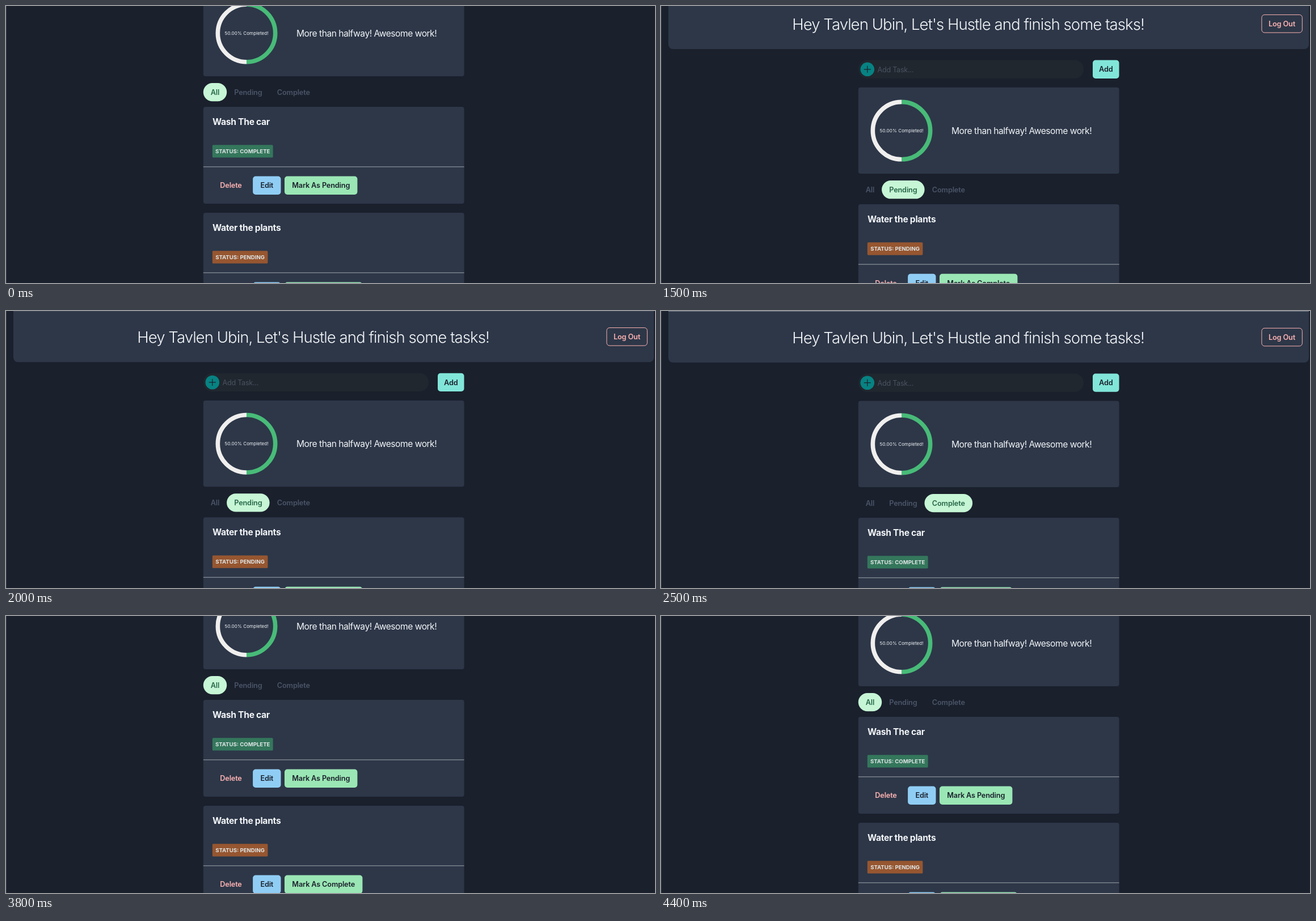
An HTML page that plays this animation: 1144 by 489 pixels, repeating every 5 s.

```html
<!DOCTYPE html>
<html lang="en">
<head>
<meta charset="utf-8">
<title>Tasks</title>
<style>
  html, body { margin: 0; width: 100%; height: 100%; overflow: hidden; background: #1a202c; }
  svg { display: block; width: 1144px; height: 489px; }
  text { font-family: Inter, Roboto, sans-serif; font-optical-sizing: none; white-space: pre; }
</style>
</head>
<body>
<svg id="stage" viewBox="0 0 1144 489"></svg>
<script>
const LOOP = 5000, STEP = 100, PITCH = 187;
const INK = '#1a202c', PANEL = '#2d3748', PALE = '#f3f5f8';

const rect = (x, y, w, h, r, fill, more = '') =>
  `<rect x="${x}" y="${y}" width="${w}" height="${h}" rx="${r}" fill="${fill}" ${more}/>`;

// Text whose capitals are centred on cy
const label = (str, x, cy, size, fill, { weight = 400, gap = 0, anchor = 'start' } = {}) =>
  `<text x="${x}" y="${cy + size * 0.363}" font-size="${size}" font-weight="${weight}"
    letter-spacing="${gap}" text-anchor="${anchor}" fill="${fill}">${str}</text>`;

const caption = (str, cx, cy, fill) =>
  label(str, cx, cy, 12.7, fill, { weight: 600, gap: -0.15, anchor: 'middle' });

const button = (str, x, y, w, fill) =>
  rect(x, y, w, 32.3, 5, fill) + caption(str, x + w / 2, y + 16.2, INK);

function header() {
  return `<path d="M13 0H1142V83a8 8 0 0 1-8 8H21a8 8 0 0 1-8-8Z" fill="${PANEL}"/>` +
    rect(13, 0, 1129, 1, 0, '#6f7785') +
    label("Hey Tavlen Ubin, Let's Hustle and finish some tasks!", 541.5, 47, 27.6, PALE,
      { weight: 300, gap: -0.97, anchor: 'middle' }) +
    rect(1058.9, 30.3, 71.4, 31.6, 5, 'none', 'stroke="#feb2b2"') +
    caption('Log Out', 1094.5, 46.3, '#feb2b2');
}

function addBar() {
  return rect(348, 110.5, 397, 32.2, 16, '#20272f') +
    '<circle cx="363.8" cy="126.7" r="12.3" fill="#078282"/>' +
    `<path d="M357.8 126.7h12M363.8 120.7v12" stroke="${INK}" stroke-width="1.2"/>` +
    label('Add Task...', 381.5, 127, 12.6, '#4a5260', { gap: -0.25 }) +
    button('Add', 761, 110.5, 46.5, '#81e6d9');
}

function progress() {
  const half = (sweep, color) =>
    `<path d="M424 184.3A50.7 50.7 0 0 ${sweep} 424 285.7" fill="none" stroke="${color}" stroke-width="7.6"/>`;
  return rect(347.8, 158.7, 459.8, 152.2, 4, PANEL) +
    half(0, '#f0efee') + half(1, '#48bb78') +
    label('50.00% Completed!', 424.2, 235, 8, PALE, { gap: 0.1, anchor: 'middle' }) +
    label('More than halfway! Awesome work!', 512, 235.5, 15.6, PALE, { gap: -0.49 });
}

function card(id, title, status, tint, badgeW, action, actionW) {
  return `<g id="${id}">` +
    rect(347.8, 365, 459.8, 171, 4, PANEL) +
    label(title, 364, 391, 15.6, PALE, { weight: 700, gap: -0.28 }) +
    rect(363.8, 432.2, badgeW, 22.4, 1.6, tint) +
    label('STATUS: ' + status, 363.8 + badgeW / 2, 443.5, 9.6, '#dfe5e6', { weight: 700, anchor: 'middle' }) +
    rect(347.8, 470.4, 459.8, 1, 0, '#a0a5ae') +
    caption('Delete', 396.5, 503.8, '#feb2b2') +
    button('Edit', 435.1, 487.6, 49.4, '#90cdf4') +
    button(action, 491, 487.6, actionW, '#9ae6b4') + '</g>';
}

const tabs = [['All', 347.8, 41.4], ['Pending', 389.1, 75.5], ['Complete', 464.5, 84.6]];
const tabBar = () => tabs.map(([name, x, w]) =>
  `<g class="tab">${rect(x, 323, w, 32.2, 16, '#c6f6d5')}${caption(name, x + w / 2, 339.3, '')}</g>`).join('');

const stage = document.getElementById('stage');
stage.innerHTML = `<g id="page">${header()}${addBar()}${progress()}${tabBar()}` +
  card('wash', 'Wash The car', 'COMPLETE', '#34775c', 106.8, 'Mark As Pending', 128.4) +
  card('water', 'Water the plants', 'PENDING', '#965630', 97.6, 'Mark As Complete', 137.4) +
  '</g>' + rect(0, 0, 1, 489, 0, '#3b424d');

const page = document.getElementById('page');
const wash = document.getElementById('wash');
const water = document.getElementById('water');
const tabNodes = [...document.querySelectorAll('.tab')];

// Start time, chosen tab, previous tab
const picks = [[-1000, 0, 0], [900, 1, 0], [2300, 2, 1], [3100, 0, 2]];

// The page rubber-bands back after being pulled past its end
function scrollAt(t) {
  if (t < 900) return PITCH;
  if (t < 1500) return 0;
  if (t < 2100) return 4.5 * 0.55 ** ((t - 1700) / 100);
  if (t < 3700) return 0;
  if (t < 3800) return 110;
  return PITCH + (t < 4400 ? 30 * 0.5 ** ((t - 3800) / 100) : 0);
}

const mix = (a, b, p) => `rgb(${a.map((v, i) => Math.round(v + (b[i] - v) * p))})`;

function draw(t) {
  const [start, now, before] = picks.filter(p => p[0] <= t).pop();
  const k = Math.min(1, (t - start + 30) / 200);
  const fade = k * k * (3 - 2 * k);

  tabNodes.forEach((node, i) => {
    const on = i === now ? fade : i === before ? 1 - fade : 0;
    node.firstChild.setAttribute('fill-opacity', on);
    node.lastChild.setAttribute('fill', mix([74, 85, 104], [39, 103, 73], on));
  });

  wash.style.display = now === 1 ? 'none' : '';
  water.style.display = now === 2 ? 'none' : '';
  water.setAttribute('transform', `translate(0 ${now === 0 ? PITCH : 0})`);
  page.setAttribute('transform', `translate(0 ${-scrollAt(t)})`);
}

const origin = performance.now();
function tick() {
  const t = (performance.now() - origin) % LOOP;
  draw(Math.floor(t / STEP) * STEP);
  requestAnimationFrame(tick);
}
tick();
</script>
</body>
</html>
```
